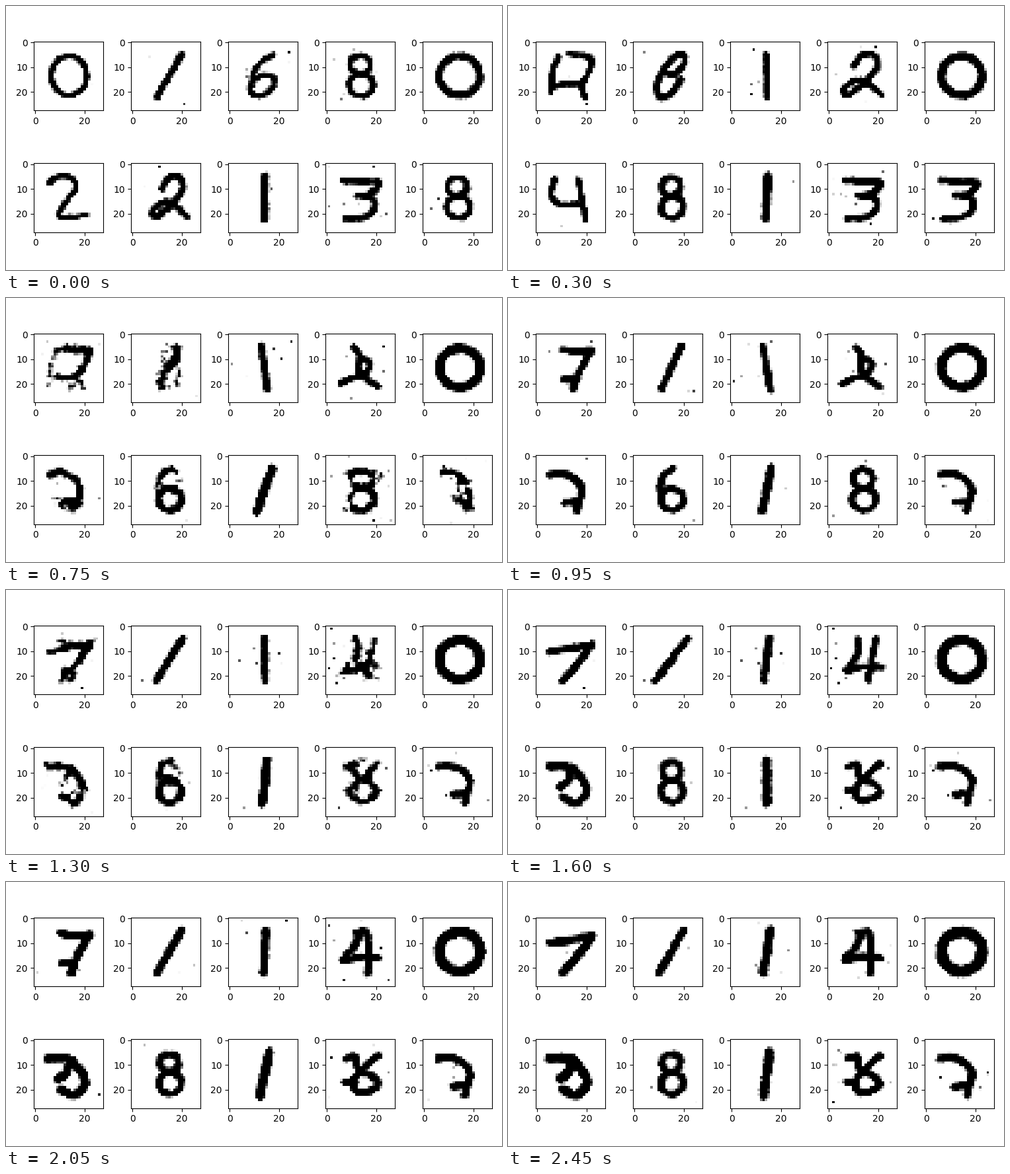
Recreate the animation shown at these times as a matplotlib script. Size 750 px wide and 400 px high, loop 2500 ms.

```python
import math

import numpy as np
import matplotlib.pyplot as plt
from matplotlib.animation import FuncAnimation

W, H, DPI = 750, 400, 100
FRAMES, STEP = 50, 50
SIZE = 28
KEYS = [0, 6, 11, 19, 32, 41, 49]
MID_Y, HALF_Y = 13.5, 8.6  # every digit fills the same rows


def ring(cx, cy, rx, ry):
    angles = np.linspace(0, 2 * math.pi, 13)
    return [(cx + rx * math.cos(a), cy + ry * math.sin(a)) for a in angles]


# Pen strokes in a box from -1 to 1, smoothed when drawn
GLYPHS = {
    "0": [ring(0, 0, .85, .92)],
    "1": [[(0, y) for y in np.linspace(-1, 1, 6)]],
    "2": [[(-.95, -.7), (-.5, -.98), (.2, -.95), (.45, -.5), (0, .1),
           (-.45, .85), (.1, .92), (1, .82)]],
    "looped 2": [[(-.4, -.45), (0, -.95), (.6, -.95), (.75, -.4), (.2, .25),
                  (-.7, .9), (-.95, .65), (-.4, .25), (.2, .3), (1, .9)]],
    "hooked 2": [[(-.85, -.6), (-.2, -1), (.4, -.5), (.65, .2), (.6, .7),
                  (0, .85), (-.6, .5), (.6, .5)]],
    "loose 2": [[(-.7, -.95), (.1, -.7), (.1, .1), (.4, .7), (1.2, .95)],
                [(-.2, .35), (.4, .15)]],
    "3": [[(-.9, -.8), (0, -.75), (.95, -.7), (.5, -.2), (-.2, -.1)],
          [(-.1, -.1), (.6, .05), (.7, .5), (.2, .9), (-.8, .98)]],
    "round 3": [[(-1, -.72), (0, -.7), (.45, -.4), (.95, .4), (.4, 1), (-.3, .75)],
                [(.1, -.6), (0, -.1), (-.45, .25)]],
    "4": [[(-.2, -.95), (-.2, -.3), (-.75, .5), (0, .35), (1, .35)],
          [(.7, -.95), (.5, 0), (.3, .95)]],
    "open 4": [[(-.75, -.85), (-.95, -.2), (-.5, .3), (.6, .3)],
               [(.45, -.85), (.65, 0), (.85, 1)]],
    "closed 4": [[(-.2, -.9), (.3, -.9), (.45, 0), (.4, 1)],
                 [(0, -.85), (-.3, -.2), (-.85, .4), (0, .25), (.9, .3)]],
    "arch": [[(-.6, -.9), (-.9, -.2), (-.95, .75)],
             [(-.1, -1), (.6, -.95), (1, -.7), (.75, 0), (.5, .45), (.65, 1)],
             [(-.95, .65), (-.5, .42), (.5, .4)]],
    "cross": [[(-.3, -.95), (-.05, -.6), (-.05, .2), (.3, .5), (.9, .9)],
              [(.2, -.4), (.5, -.15), (.2, .35), (-.4, .5), (-1, .75)]],
    "6": [ring(.05, .45, .65, .5), [(.1, -1), (-.5, -.6), (-.65, 0), (-.5, .5)]],
    "7": [[(-1, -.4), (0, -.55), (1, -.72)], [(1, -.72), (.4, .1), (-.4, 1)]],
    "barred 7": [[(-.4, -.85), (.2, -.75), (1, -.8)], [(.9, -.7), (.4, .2), (.1, 1)],
                 [(-.35, .55), (.3, .5)]],
    "hook": [[(-1, -.7), (-.4, -.75), (.3, -.5), (.65, 0), (.5, .6), (.4, 1)],
             [(-.2, .6), (.4, .55)]],
    "8": [ring(0, -.52, .52, .42), ring(.05, .45, .62, .5)],
    "curly 8": [[(-.5, -.1), (.2, -.1), (.7, -.6), (.4, -1), (-.2, -.8), (-.7, -.1),
                 (-.8, .5), (-.4, 1), (.3, .8), (.7, .2)]],
    "crossed 8": [[(.9, -.85), (.2, -.3), (-.35, .3), (-.2, .85), (.5, .8),
                   (.9, .45), (.5, .05), (0, -.05)],
                  [(-.75, -.7), (-.3, -.8), (-.2, -.3)], [(-.8, .4), (-.3, .4)]],
}


class Panel:
    """Digits in turn, with their box, first and last pen width, slant and specks."""

    def __init__(self, names, mid, half, pen, specks, leans=(0,) * 7):
        self.names = names
        self.mid, self.half, self.specks = mid, half, specks
        self.pens = np.linspace(*pen, len(KEYS))
        self.leans = leans


PANELS = [
    Panel(["0", "arch", "arch", "barred 7", "7", "barred 7", "7"],
          13.8, 8.4, (1.2, 1.8), 2),
    Panel(["1", "curly 8", "8"] + ["1"] * 4, 15, 6, (1.4, 1.7), 2,
          (5, 2, 1, 4, 6.5, 5, 5)),
    Panel(["6"] + ["1"] * 6, 14.2, 7.3, (1.2, 1.8), 5,
          (3, 0, -.9, -1.5, 1.1, .5, 1.3)),
    Panel(["8", "looped 2", "cross", "cross", "4", "closed 4", "closed 4"],
          13.5, 8, (1.3, 1.6), 6),
    Panel(["0"] * 7, 14.5, 9.7, (1.6, 2.4), 0),
    Panel(["2", "open 4", "hooked 2", "hook"] + ["round 3"] * 3,
          13, 7.8, (1.2, 2), 1),
    Panel(["looped 2", "8", "8", "6", "8", "8", "8"], 15, 7.2, (1.4, 1.5), 2),
    Panel(["1"] * 7, 14.2, 7, (1.7, 2), 1, (0, .4, 4.2, 1.9, 0, 1.9, 1.2)),
    Panel(["3"] * 3 + ["8"] + ["crossed 8"] * 3, 13.8, 7.8, (1.4, 1.5), 8),
    Panel(["8", "3", "loose 2"] + ["hook"] * 4, 13.5, 7.8, (1.3, 1.7), 5),
]

YY, XX = np.mgrid[0:SIZE, 0:SIZE].astype(float)


def smooth(points, steps=12):
    """Catmull-Rom curve through the points."""
    p = np.array(points)
    p = np.vstack([2 * p[0] - p[1], p, 2 * p[-1] - p[-2]])
    t = np.linspace(0, 1, steps)[:, None]
    return np.vstack([
        b + .5 * t * (c - a + t * (2 * a - 5 * b + 4 * c - d + t * (3 * (b - c) + d - a)))
        for a, b, c, d in zip(p, p[1:], p[2:], p[3:])])


OUTLINES = {name: np.vstack([smooth(s) for s in strokes])
            for name, strokes in GLYPHS.items()}


def field(panel, name, lean, pen):
    """Positive inside the pen line, negative outside, limited to one cell."""
    gx, gy = OUTLINES[name].T
    x = panel.mid + panel.half * gx - lean * gy
    y = MID_Y + HALF_Y * gy
    gap = np.hypot(XX[..., None] - x, YY[..., None] - y).min(axis=2)
    return np.clip(pen - gap, -1, 1)


def patches(rng):
    """Slightly blurred noise, so that edges break up in small clumps."""
    n = rng.uniform(-1, 1, (SIZE, SIZE))
    return (2 * n + sum(np.roll(n, s, axis) for s in (-1, 1) for axis in (0, 1))) / 3


def cells(i, n):
    panel = PANELS[i]
    k = min(int(np.searchsorted(KEYS, n, side="right")) - 1, len(KEYS) - 2)
    u = (n - KEYS[k]) / (KEYS[k + 1] - KEYS[k])
    lean = np.interp(n, KEYS, panel.leans)
    pen = np.interp(n, KEYS, panel.pens)
    old, new = panel.names[k:k + 2]
    if old == new:
        shape, rough = field(panel, old, lean, pen), .25
    else:
        shape = ((1 - u) * field(panel, old, panel.leans[k], pen)
                 + u * field(panel, new, panel.leans[k + 1], pen))
        rough = .25 + 1.2 * u * (1 - u)
    rng = np.random.default_rng(100 * i + n)
    ink = np.clip(.5 + 2.2 * (shape + rough * patches(rng)), 0, 1)

    # Specks stay around for as long as a digit does
    rng = np.random.default_rng(10 * i + k + round(u))
    for x, y in rng.integers(1, SIZE - 1, (panel.specks, 2)):
        ink[y, x] = max(ink[y, x], rng.uniform(.05, 1) ** 1.5)
    return ink


plt.rcParams["font.family"] = "DejaVu Sans"
fig = plt.figure(figsize=(W / DPI, H / DPI), dpi=DPI, facecolor="white")
LEFT, PITCH, SIDE = 42.4, 147, 104.6
images = []
for top in (53.57, 238.1):
    for col in range(5):
        ax = fig.add_axes([(LEFT + PITCH * col) / W, 1 - (top + SIDE) / H,
                           SIDE / W, SIDE / H])
        images.append(ax.imshow(np.zeros((SIZE, SIZE)), cmap="gray_r", vmin=0,
                                vmax=1, interpolation="nearest", aspect="auto"))
        ax.set_xticks([0, 20])
        ax.set_yticks([0, 10, 20])


def update(n):
    for i, image in enumerate(images):
        image.set_data(cells(i, n))
    return images


anim = FuncAnimation(fig, update, frames=FRAMES, interval=STEP, repeat=True)
plt.show()
```
